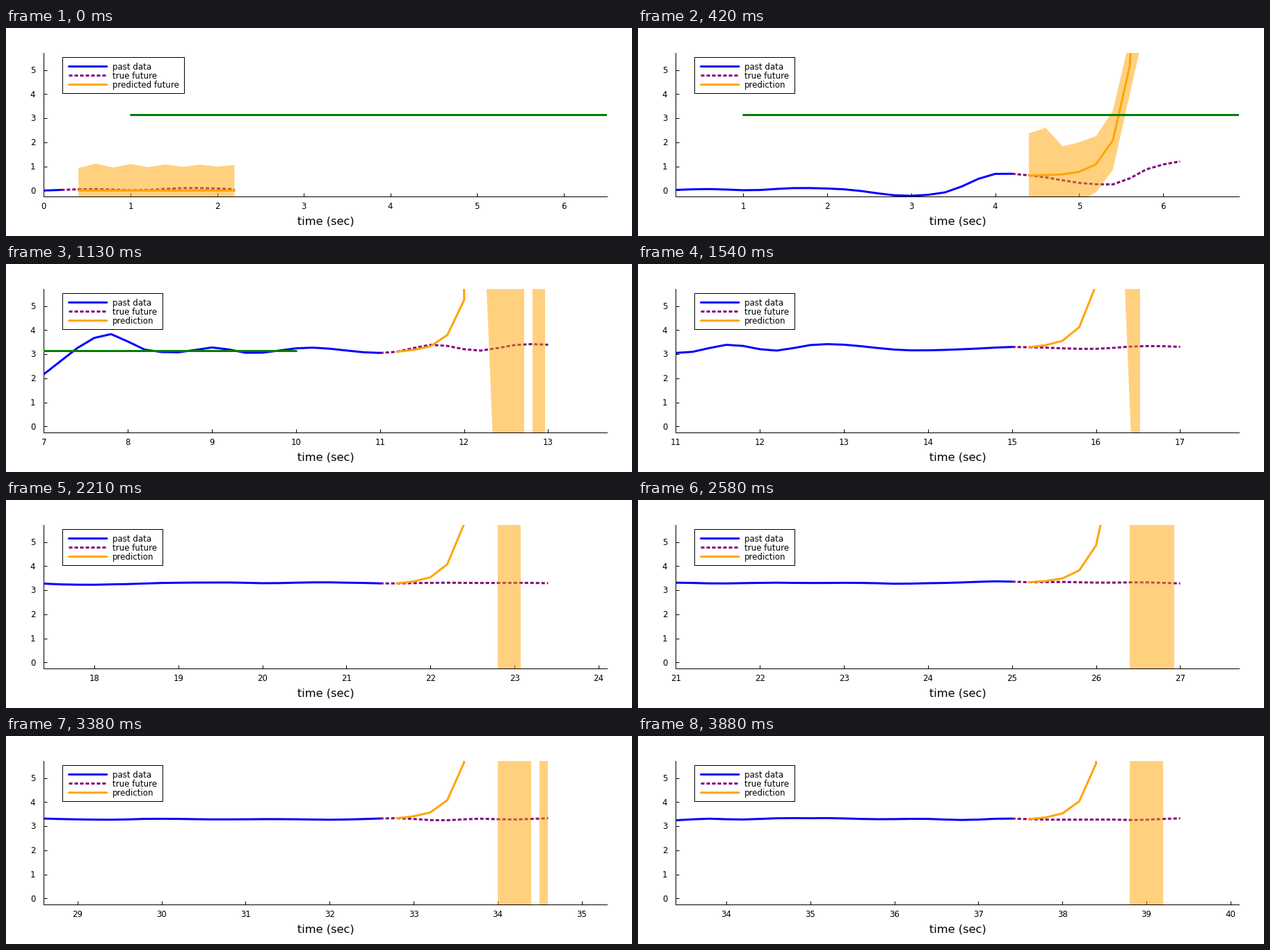
Animation, 900 px wide and 300 px high, one loop 3930 ms. Source, as a matplotlib script:

```python
import math

import matplotlib.pyplot as plt
import numpy as np
from matplotlib.animation import FuncAnimation
from matplotlib.collections import PolyCollection
from matplotlib.patches import Rectangle

W, H, DPI = 900, 300, 100
LOOP_MS, TICK_MS, STATES = 3930, 10, 94
PX = 72 / DPI
LEFT, RIGHT, TOP, BOTTOM = 54.4, 864.0, 35.5, 242.9
Y_LO, Y_HI = -0.245, 5.722
DT, AHEAD = 0.2, 10
J = np.arange(AHEAD)
UPRIGHT = 3.29

plt.rcParams["font.family"] = "DejaVu Sans"

# Swing-up: (time, angle) near the turning points
KEYS = [(0, 0), (0.6, 0.06), (1.1, 0.01), (1.6, 0.10), (2.2, 0.05),
        (3, -0.22), (3.4, -0.08), (4, 0.69), (4.4, 0.63), (5.2, 0.26),
        (5.45, 0.28), (5.8, 0.88), (6.4, 1.37), (7, 2.17), (7.4, 3.26),
        (7.75, 3.84), (8.2, 3.19), (8.6, 3.08), (9.05, 3.28), (9.4, 3.06),
        (10.1, 3.27), (11.2, 3.10), (11.6, 3.39), (12.2, 3.15),
        (12.6, 3.38), (13.8, 3.16), (15, UPRIGHT)]


def hermite(x, points):
    """Smooth curve through the points, held after the last one."""
    xp, yp = np.array(points).T
    m = np.gradient(yp, xp)
    x = np.minimum(x, xp[-1])
    i = np.clip(np.searchsorted(xp, x, "right") - 1, 0, len(xp) - 2)
    h = xp[i + 1] - xp[i]
    u = (x - xp[i]) / h
    return (yp[i] * (1 + 2 * u) * (1 - u) ** 2 + m[i] * h * u * (1 - u) ** 2
            + yp[i + 1] * u * u * (3 - 2 * u) + m[i + 1] * h * u * u * (u - 1))


TIME = np.arange(198) * DT
noise = np.random.default_rng(4).normal(0, 0.028, TIME.size)
wobble = np.convolve(noise, np.array([1, 2, 2, 1]) / math.sqrt(10), "same")
ANGLE = hermite(TIME, KEYS) + wobble * np.interp(TIME, [14, 16], [0, 1])


def gain(t):
    """How strongly the forecast runs away."""
    return np.interp(t, [3, 7.4, 15, 21.4, 25, 32.6],
                     [0, 0.0187, 0.028, 0.0267, 0.0166, 0.025])


def forecast(n):
    """Mean and half width of the prediction made at step n."""
    t, now, base = TIME[n], ANGLE[n], ANGLE[n + 1]
    growth = gain(t) * 3.1 ** J
    if growth[4] > 1.6:
        growth[5:] = 300
    trust = np.interp(t, [0.2, 3], [0, 1])
    mean = trust * (base + (J > 0) * 0.12 * (base - now))
    mean = mean + (J > 0) * np.minimum(growth, 300)

    prior = 1.03 - 0.1 * (-1.0) ** J * np.exp(-0.12 * J)
    swing = np.interp(J, [0, 1, 2], [2.38, 2.65, 1.33])
    mix = np.interp(t, [0.2, 7.4], [0, 1])
    half = (1 - mix) * prior + mix * swing
    return mean, half * np.interp(t, [7.4, 10], [1, 0])


def bars(k, t):
    """Stretches where the band fills the plot; weak gain delays their end."""
    early = np.interp(t, [7.4, 18], [0.2, 0])
    lean = np.interp(t, [15, 20], [0.07, 0])
    start = t + 1.4 - early
    end = t - early + np.interp(gain(t), [0.0166, 0.0245, 0.028],
                                [1.93, 1.83, 1.58])
    polys = [[(start, Y_HI), (start + lean, Y_LO), (end, Y_LO), (end, Y_HI)]]
    if k % 9 == 0:
        a, b = end + 0.1, min(end + 0.25, t + 2)
        polys.append([(a, Y_HI), (a, Y_LO), (b, Y_LO), (b, Y_HI)])
    return polys


def band(k, n, mean, half):
    polys = bars(k, TIME[n]) if TIME[n] > 6.5 else []
    if half.any():
        x = TIME[n + 1:n + 1 + AHEAD]
        low = np.minimum(mean - half, 7.05)
        polys.append(np.r_[np.c_[x, low], np.c_[x, mean + half][::-1]])
    return polys


fig = plt.figure(figsize=(W / DPI, H / DPI), dpi=DPI, facecolor="white")
ax = fig.add_axes([LEFT / W, 1 - BOTTOM / H,
                   (RIGHT - LEFT) / W, (BOTTOM - TOP) / H])
ax.set_ylim(Y_LO, Y_HI)
ax.set_yticks(range(6))
ax.tick_params(direction="in", length=5 * PX, width=PX,
               labelleft=False, labelbottom=False)
ax.spines[["top", "right"]].set_visible(False)
ax.spines[["left", "bottom"]].set_linewidth(PX)

page = fig.add_axes([0, 0, 1, 1])
page.set(xlim=(0, W), ylim=(H, 0))
page.axis("off")

SOLID = dict(lw=3 * PX, solid_capstyle="round", solid_joinstyle="round")
DASHED = dict(lw=3 * PX, ls=(0, (5 / 3, 1)), dash_capstyle="butt")


def label(x, y, s, size=11.75, ha="left"):
    return page.text(x, y, s, size=size * PX, ha=ha, va="baseline")


past, = ax.plot([], [], color="blue", zorder=2, **SOLID)
future, = ax.plot([], [], color="purple", zorder=3, **DASHED)
ribbon = PolyCollection([], facecolor="orange", alpha=0.5, lw=0, zorder=4)
ax.add_collection(ribbon, autolim=False)
guess, = ax.plot([], [], color="orange", zorder=5, **SOLID)
ax.plot([1, 10], [math.pi] * 2, color="green", zorder=6, **SOLID)

frame = page.add_patch(Rectangle((81.2, 42), 144, 52, fc="white", ec="black",
                                 lw=PX))
names = []
for i, (name, color, style) in enumerate([("past data", "blue", SOLID),
                                          ("true future", "purple", DASHED),
                                          ("prediction", "orange", SOLID)]):
    y = 55.5 + 13.1 * i
    page.plot([90.5, 145], [y, y], color=color, snap=False, **style)
    names.append(label(153, y + 4.6, name))

for v in range(6):
    y = BOTTOM - (v - Y_LO) / (Y_HI - Y_LO) * (BOTTOM - TOP)
    label(42.2, y + 4.3, str(v), ha="right")
label(460, 283.6, "time (sec)", 16.2, "center")
x_labels = [label(0, 261.4, "", ha="center") for _ in range(8)]


def update(tick):
    # 24 states per second, on a 10 ms clock
    k = min(((2 * tick + 1) * 12 - 1) // 100, STATES - 1)
    n = 1 + 2 * k
    t = TIME[n]
    lo, hi = max(0, t - 4), max(6.5, t + 2.7)
    ax.set_xlim(lo, hi)

    ticks = range(math.ceil(lo - 1e-6), math.floor(hi + 1e-6) + 1)
    ax.set_xticks(ticks)
    for text in x_labels:
        text.set_text("")
    for text, v in zip(x_labels, ticks):
        text.set_x(LEFT + (v - lo) / (hi - lo) * (RIGHT - LEFT))
        text.set_text(str(v))

    mean, half = forecast(n)
    start = max(0, n - 20)
    past.set_data(TIME[start:n + 1], ANGLE[start:n + 1])
    future.set_data(TIME[n:n + AHEAD + 1], ANGLE[n:n + AHEAD + 1])
    guess.set_data(TIME[n + 1:n + 1 + AHEAD], mean)
    ribbon.set_verts(band(k, n, mean, half))

    names[2].set_text("prediction" if k else "predicted future")
    frame.set_width(144 if k else 175)
    return []


anim = FuncAnimation(fig, update, frames=LOOP_MS // TICK_MS, interval=TICK_MS,
                     init_func=lambda: update(0), repeat=True, repeat_delay=0,
                     cache_frame_data=False)
plt.show()
```
